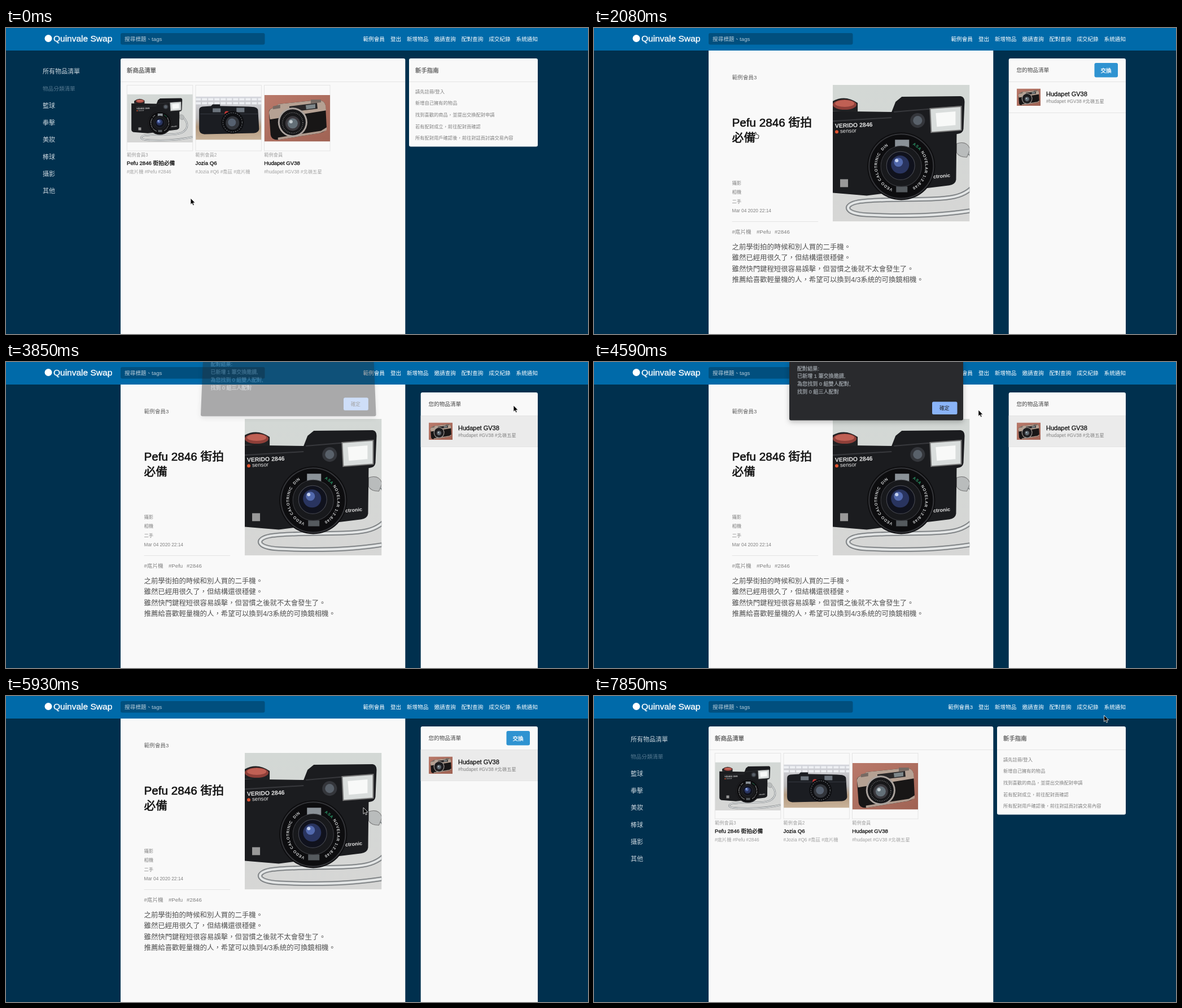
An HTML page for the animation above (8 s loop, 1031x543 px).

```html
<!DOCTYPE html>
<html lang="zh-Hant">
<head>
<meta charset="utf-8">
<title>Quinvale Swap</title>
<style>
html, body { margin: 0; width: 100%; height: 100%; overflow: hidden; background: #00304e; }
svg { display: block; }
#stage { width: 100vw; height: 100vh; }
text { font: 9.65px "Liberation Sans", "Noto Sans CJK TC", sans-serif; white-space: pre; }
text.s { font-size: 8.28px; }
text.h { font-size: 10.4px; fill: #555; stroke: #555; stroke-width: .25px; }
text.l { font-size: 11px; }
text.d { font-size: 12.4px; font-weight: 300; fill: #505050; }
text.t { font-size: 20.7px; fill: #111; stroke: #111; stroke-width: .6px; }
text.brand { font-size: 15.5px; fill: #fff; stroke: #fff; stroke-width: .35px; }
text.b { fill: #111; stroke: #111; stroke-width: .3px; }
text.w { fill: #fff; }
text.side { fill: #c9d5dd; font-weight: 300; }
text.dim { fill: #557990; }
text.g { fill: #808080; font-weight: 300; }
text.pale { fill: #a2a2a2; font-weight: 300; }
text.dlg { font-size: 9.1px; fill: #9aa0a6; stroke: #9aa0a6; stroke-width: .25px; }
text.ring { font-size: 7px; font-weight: bold; fill: #d0d2d3; letter-spacing: .7px; }
.panel { fill: #f9f9f9; }
.line { stroke: #e4e4e4; fill: none; }
</style>
</head>
<body>
<svg id="stage" viewBox="0 0 1031 543" preserveAspectRatio="none">
<defs>
  <linearGradient id="sky" x2="0" y2="1"><stop stop-color="#d3d8d5"/><stop offset="1" stop-color="#d6d6d5"/></linearGradient>
  <linearGradient id="desk" x2="0" y2="1"><stop stop-color="#d4d6dd"/><stop offset=".5" stop-color="#b9b7b8"/><stop offset=".7" stop-color="#b39a80"/><stop offset="1" stop-color="#c9b39a"/></linearGradient>
  <linearGradient id="wall" x2="1" y2="1"><stop stop-color="#b9796a"/><stop offset="1" stop-color="#a06354"/></linearGradient>
  <linearGradient id="brick" x2="1" y2="1"><stop stop-color="#65564e"/><stop offset=".5" stop-color="#49372f"/><stop offset="1" stop-color="#32241f"/></linearGradient>
  <linearGradient id="fur"><stop stop-color="#c9c6c6"/><stop offset=".5" stop-color="#e6e3e1"/><stop offset="1" stop-color="#f1eeeb"/></linearGradient>
  <path id="arcLeft" d="M106 184A43 43 0 0 1 108 103"/>
  <path id="arcRight" d="M141 106A43 43 0 0 1 138 183"/>
  <path id="strap" d="M242 120C275 160 250 190 215 198S90 200 45 207C18 212 20 228 60 230S200 236 286 214" fill="none"/>

  <symbol id="pocket" viewBox="-44 0 330 242" preserveAspectRatio="xMidYMid slice">
    <rect x="-44" width="330" height="242" fill="url(#sky)"/>
    <path d="M219 104q18-6 24 10l-6 14q-14 0-18 -8z" fill="#b9bcbc" stroke="#777"/>
    <use href="#strap" stroke="#73777a" stroke-width="8"/>
    <use href="#strap" stroke="#c6c9ca" stroke-width="5"/>
    <use href="#strap" stroke="#eceeee" stroke-width="2"/>
    <path d="M-22 46L104 48 111 30 122 21 226 20Q233 21 233 30L231 78Q230 86 219 87L218 168Q217 176 206 178L60 196-12 190Q-22 188-22 176z" fill="#1b1c1f"/>
    <path d="M-8 46V34Q18 14 44 32V48z" fill="#202123"/>
    <ellipse cx="21" cy="35" rx="21" ry="9" fill="#8e3f39"/>
    <ellipse cx="21" cy="33" rx="17" ry="6" fill="#c06054"/>
    <path d="M108 48L226 38M0 64L104 58" stroke="#38393d" stroke-width="2"/>
    <path d="M172 42L227 38V80L174 84z" fill="#d9dddc" stroke="#777" stroke-width="2"/>
    <path d="M182 50L217 47V71L184 74z" fill="#f8f9f8"/>
    <circle cx="150" cy="63" r="13" fill="#34363b"/><circle cx="150" cy="63" r="8" fill="#59616a"/>
    <g fill="#e5e5e5">
      <text x="4" y="76" transform="rotate(-2 4 76)" style="font-size:10.5px;font-weight:bold">VERIDO 2846</text>
      <text x="13" y="85" transform="rotate(-2 13 85)">sensor</text>
      <text x="173" y="166" transform="rotate(-5 173 166)" style="font-size:9px;font-weight:bold">ectronic</text>
    </g>
    <circle cx="7" cy="83" r="3" fill="#e0532f"/>
    <rect x="13" y="167" width="14" height="14" fill="#999"/>
    <circle cx="121" cy="144" r="60" fill="#0d0d0f"/>
    <circle cx="121" cy="144" r="57" fill="none" stroke="#35363a" stroke-width="2"/>
    <text class="ring"><textPath href="#arcLeft">VEDO CALOTRINIC  DIN</textPath></text>
    <text class="ring"><textPath href="#arcRight"><tspan fill="#2c9a6a">ASA</tspan> NOVELAR 1:2.8/40</textPath></text>
    <path d="M110 97h25v14h-25z" fill="#8b9298"/><path d="M112 180h20v10h-20z" fill="#555a5e"/>
    <circle cx="121" cy="144" r="36" fill="#18191c" stroke="#3c3d42"/>
    <circle cx="120" cy="143" r="25" fill="#10121d" stroke="#4b4d55"/>
    <circle cx="119" cy="141" r="16" fill="#29345f"/><circle cx="116" cy="137" r="8" fill="#5269ad"/>
    <circle cx="113" cy="134" r="3" fill="#c4d1ef"/>
  </symbol>

  <symbol id="range" viewBox="0 0 116 77" preserveAspectRatio="none">
    <rect width="116" height="77" fill="url(#desk)"/>
    <path d="M0 5H116M0 12H116" stroke="#eef0f4" stroke-width="4" stroke-dasharray="9 2"/>
    <path d="M6 24Q6 19 12 18L27 17 30 14H43V17L94 18Q109 18 110 24L112 58Q111 64 103 65L15 67Q6 66 6 58z" fill="#1b1d22"/>
    <path d="M8 31H110" stroke="#353941"/>
    <path d="M30 21H44V28H30zM72 20H86V28H72z" fill="#6c747d"/>
    <circle cx="55" cy="30" r="4" fill="#c63835"/>
    <circle cx="65" cy="46" r="20" fill="#0e0f12"/><circle cx="65" cy="46" r="17" fill="none" stroke="#71757b" stroke-dasharray="2 2"/>
    <circle cx="65" cy="47" r="12" fill="#32353b"/><circle cx="64" cy="46" r="7" fill="#566170"/>
  </symbol>

  <symbol id="classic" viewBox="0 0 116 82" preserveAspectRatio="none">
    <rect width="116" height="82" fill="url(#wall)"/>
    <path d="M8 29Q9 23 18 22L25 16 92 9Q106 8 108 18L110 58Q109 65 98 67L24 79Q12 79 11 70z" fill="#181616"/>
    <path d="M8 30Q9 23 18 22L25 16 92 9Q106 8 108 18L109 27 10 43z" fill="#b5a193"/>
    <path d="M15 20L28 17V23L15 25zM82 8H100V13L82 15z" fill="#766a63"/>
    <path d="M44 20L93 14 94 24 45 30z" fill="#292728"/><path d="M73 18L90 16V23L74 25z" fill="#7d8689"/>
    <path d="M24 75L100 63 110 57V62L98 67 24 79z" fill="#b09b8e"/>
    <circle cx="50" cy="48" r="26" fill="#aaa29d"/><circle cx="50" cy="48" r="23" fill="#171719"/>
    <circle cx="50" cy="49" r="18" fill="none" stroke="#a6a6a6" stroke-dasharray="1 2"/>
    <circle cx="50" cy="50" r="13" fill="#3b393e"/><circle cx="50" cy="50" r="9" fill="#647078"/><circle cx="47" cy="47" r="3" fill="#c1cace"/>
  </symbol>

  <symbol id="cat" viewBox="0 0 242 242">
    <rect width="242" height="242" fill="url(#brick)"/>
    <path d="M0 30L80 0M0 90L130 20M120 60L242 15M30 0L70 60M160 0L180 40" stroke="#33271f" stroke-width="3"/>
    <ellipse cx="226" cy="90" rx="50" ry="34" fill="#1b1310"/>
    <path d="M0 158L242 192V220L0 178z" fill="#78635a"/><path d="M0 178L242 220V242H0z" fill="#3b2d29"/>
    <path d="M41 132C38 82 60 54 100 52C145 53 176 92 177 142C178 178 165 198 140 186L104 198C62 192 45 172 41 132z" fill="url(#fur)"/>
    <path d="M46 98C54 68 76 50 104 52L118 100Q106 126 92 112Q84 92 74 104Q62 114 46 98z" fill="#1e2027"/>
    <path d="M54 160Q74 192 108 186L104 199Q66 192 54 160z" fill="#aaa4a2"/>
    <ellipse cx="134" cy="111" rx="43" ry="34" fill="#f1eeeb"/>
    <path d="M91 113L90 59Q105 65 119 81L148 80Q161 63 173 59Q178 85 174 111Q167 126 157 112Q142 104 135 88Q127 110 111 120Q99 126 91 113z" fill="#1c1d23"/>
    <path d="M95 70L113 83 98 94zM169 69L155 84 170 92z" fill="#a27f77"/>
    <g fill="#b3bd9d"><ellipse cx="120" cy="111" rx="8" ry="6"/><ellipse cx="152" cy="111" rx="8" ry="6"/></g>
    <g fill="#111"><circle cx="121" cy="111" r="3.5"/><circle cx="151" cy="111" r="3.5"/><path d="M127 136l5-9 6 5-3 10zM124 129l4 4-4 2z"/></g>
    <path d="M132 124h9l-4 6z" fill="#d2938b"/>
    <path d="M136 130v6q-7 5-13 1M136 136q7 5 13 1" fill="none" stroke="#8a7771"/>
    <g fill="#f2efec"><path d="M98 155h30l-3 48h-23zM139 155h27l7 43h-28z"/><ellipse cx="112" cy="205" rx="17" ry="10"/><ellipse cx="160" cy="202" rx="17" ry="10"/></g>
    <path d="M128 160L144 198" stroke="#b7aca7" stroke-width="4"/>
  </symbol>
</defs>

<rect width="1031" height="543" fill="#00304e"/>
<rect width="1031" height="40" fill="#006aa9"/>
<circle cx="75" cy="18.5" r="6.5" fill="#fff"/>
<text class="brand" x="84" y="24">Quinvale Swap</text>
<rect x="203" y="9" width="255.5" height="20.5" rx="3" fill="#014f7e"/>
<text x="210" y="23" fill="#b5cad8">搜尋標題、tags</text>
<g id="nav"><text id="user" class="w" x="671" y="23" text-anchor="end"></text></g>

<g id="list">
  <path class="panel" d="M203 543V57q0-3 3-3H704.3q3 0 3 3V543z"/>
  <rect class="panel" x="714" y="54" width="228" height="156.5" rx="3"/>
  <path class="line" d="M203 95.5H707M714 95.5H942"/>
  <text class="h" x="214" y="79">新商品清單</text>
  <text class="h" x="725" y="79">新手指南</text>
</g>

<g id="detail">
  <path class="panel" d="M203 40H707.3V543H203zM734.7 543V57q0-3 3-3H939q3 0 3 3V543z"/>
  <rect id="row" x="734.7" y="95" width="207.3" height="56" fill="#ebebeb"/>
  <path class="line" d="M735 95.5H942M735 150.5H942M244.5 343.5H397"/>
  <text x="244.5" y="90.5" fill="#666">範例會員3</text>
  <text class="t" x="244.5" y="175">Pefu 2846 街拍</text>
  <text class="t" x="244.5" y="201.5">必備</text>
  <svg x="423" y="101" width="242.5" height="242.5"><use id="photo" href="#pocket" width="242.5" height="242.5"/></svg>
  <text x="748.5" y="78" fill="#444">您的物品清單</text>
  <g id="swap">
    <rect x="886.5" y="62" width="41.5" height="25.5" rx="3" fill="#2f93d1"/>
    <text class="w" x="897.5" y="78.5" stroke="#fff" stroke-width=".3">交換</text>
  </g>
  <use href="#classic" x="749" y="107.5" width="42" height="30.5"/>
  <text class="b l" x="801" y="121">Hudapet GV38</text>
</g>

<g id="dialog">
  <path id="sheet" fill="#292a2d" style="filter:drop-shadow(0 3px 5px rgba(0,0,0,.25))"/>
  <g id="words">
    <rect x="599" y="69" width="44.5" height="22.5" rx="2.5" fill="#8ab4f8"/>
    <text x="612" y="83.5" fill="#202124" style="font-size:8.7px">確定</text>
  </g>
</g>

<g id="pointer">
  <path id="arrow" d="M0 0V11.3L2.6 8.9 4.4 12.9 6.3 12 4.6 8.2H8z" fill="#000" stroke="#fff" stroke-width=".8"/>
  <path id="hand" d="M-1 7V1.2Q0 -.6 1.2 1.2V4.4Q2.6 3.6 3 5Q4.6 4.4 4.8 5.8Q6 5.4 6 7L5.2 11.5H-.2L-3.4 7.6Q-3.4 6-1 7.4z" fill="#fff" stroke="#000" stroke-width=".9"/>
</g>
</svg>

<script>
const $ = id => document.getElementById(id);
const NS = "http://www.w3.org/2000/svg";

function add(parent, tag, attrs, content = "") {
  const el = document.createElementNS(NS, tag);
  for (const k in attrs) el.setAttribute(k, attrs[k]);
  el.textContent = content;
  $(parent).append(el);
}
const label = (parent, cls, x, y, str) => add(parent, "text", { class: cls, x, y }, str);
const column = (parent, cls, x, y, gap, lines) =>
  lines.forEach((s, i) => label(parent, cls, x, y + i * gap, s));

label("nav", "w", 681, 23, "登出");
["新增物品", "邀請查詢", "配對查詢", "成交紀錄", "系統通知"]
  .forEach((s, i) => label("nav", "w", 710 + i * 48.4, 23, s));

label("list", "side l", 65, 80.5, "所有物品清單");
label("list", "dim", 65, 110.5, "物品分類清單");
column("list", "side l", 65, 141.5, 30.35, ["籃球", "拳擊", "美妝", "棒球", "攝影", "其他"]);
column("list", "g s", 725, 115.5, 20.7, ["請先註冊/登入", "新增自己擁有的物品",
  "找到喜歡的商品，並提出交換配對申請", "若有配對成立，前往配對頁確認",
  "所有配對用戶確認後，前往對話頁討論交易內容"]);

[
  ["pocket", 117.5, 85.5, "範例會員3", "Pefu 2846 街拍必備", "#底片機 #Pefu #2846"],
  ["range", 121.5, 77, "範例會員2", "Jozia Q6", "#Jozia #Q6 #喬茲 #底片機"],
  ["classic", 119, 82.5, "範例會員", "Hudapet GV38", "#hudapet #GV38 #北嶺五星"]
].forEach(([pic, y, height, owner, name, tags], i) => {
  const x = 214 + i * 121.6;
  add("list", "rect", { class: "line", x: x + .3, y: 101.5, width: 116.5, height: 116.5 });
  add("list", "use", { href: "#" + pic, x: x + .5, y, width: 116.3, height });
  label("list", "pale s", x, 228, owner);
  label("list", "b", x, 243, name);
  label("list", "pale s", x, 257.5, tags);
});

column("detail", "g s", 244.5, 277.5, 16.55, ["攝影", "相機", "二手", "Mar 04 2020 22:14"]);
[["#底片機", 244.5], ["#Pefu", 288], ["#2846", 320]]
  .forEach(([s, x]) => label("detail", "g", x, 364.5, s));
column("detail", "d", 244.5, 393, 19.4, ["之前學街拍的時候和別人買的二手機。",
  "雖然已經用很久了，但結構還很穩健。", "雖然快門鍵程短很容易誤擊，但習慣之後就不太會發生了。",
  "推薦給喜歡輕量機的人，希望可以換到4/3系統的可換鏡相機。"]);
[["#hudapet", 801], ["#GV38", 838], ["#北嶺五星", 866]]
  .forEach(([s, x]) => label("detail", "g s", x, 132.5, s));
column("words", "dlg", 360, 13, 13.85, ["配對結果:", "已新增 1 筆交換邀請,",
  "為您找到 0 組雙人配對,", "找到 0 組三人配對"]);

// Pointer moves: start time, number of steps, end x, end y
const STEP = 146;
const moves = [
  [300, 4, 286, 184.5], [2227, 7, 813, 119], [3260, 3, 899, 77], [3997, 7, 627, 87],
  [5180, 4, 633, 198], [6530, 7, 909, 17], [7556, 1, 903.5, 29], [7710, 2, 903.5, 39.5]
];

function pointerAt(t) {
  let x = 327, y = 302;
  for (const [start, n, toX, toY] of moves) {
    if (t < start) break;
    const k = Math.min(n, Math.floor((t - start) / STEP) + 1) / n;
    const u = k * k * (3 - 2 * k);
    x += (toX - x) * u;
    y += (toY - y) * u;
  }
  return [x, y];
}

const show = (id, on) => $(id).style.display = on ? "" : "none";
const between = (v, a, b) => v >= a && v < b;

function drawDialog(t) {
  const open = between(t, 3850, 5180);
  show("dialog", open);
  if (!open) return;
  const tilted = t < 3997;
  const [alpha, dy] = tilted ? [.38, -5.7] : t < 5030 ? [1, 1.5] : [.82, 0];
  const inset = tilted ? 4 : 0, left = tilted ? 345 : 346, right = tilted ? 655.5 : 654;
  const bottom = 102 + dy;
  $("sheet").setAttribute("d", `M${left + inset} -3H${right - inset}L${right} ${bottom - 3}q0 3-3 3H${left + 3}q-3 0-3-3z`);
  $("words").setAttribute("transform", `translate(${tilted ? 8 : 0} ${dy}) scale(${tilted ? .985 : 1} 1)`);
  $("dialog").setAttribute("opacity", alpha);
}

function draw(t) {
  const list = t < 2080 || t >= 6080;
  const button = !between(t, 3850, 5180);
  const [x, y] = pointerAt(t);
  const inside = (x0, y0, x1, y1) => between(x, x0, x1) && between(y, y0, y1);
  const hand = list
    ? inside(214, 101, 575, 262) || inside(627, 12, 942, 27)
    : t < 2227 || inside(735, 95, 942, 151) || button && inside(886, 62, 928, 88);

  show("list", list);
  show("detail", !list);
  show("row", t >= 2950);
  show("swap", button);
  show("arrow", !hand);
  show("hand", hand);
  $("user").textContent = t < 6080 ? "範例會員" : "範例會員3";
  $("photo").setAttribute("href", between(t, 5030, 5930) ? "#cat" : "#pocket");
  drawDialog(t);
  $("pointer").setAttribute("transform", `translate(${x} ${y})`);
}

const origin = performance.now();
function tick() {
  draw((performance.now() - origin) % 8000);
  requestAnimationFrame(tick);
}
tick();
</script>
</body>
</html>
```
